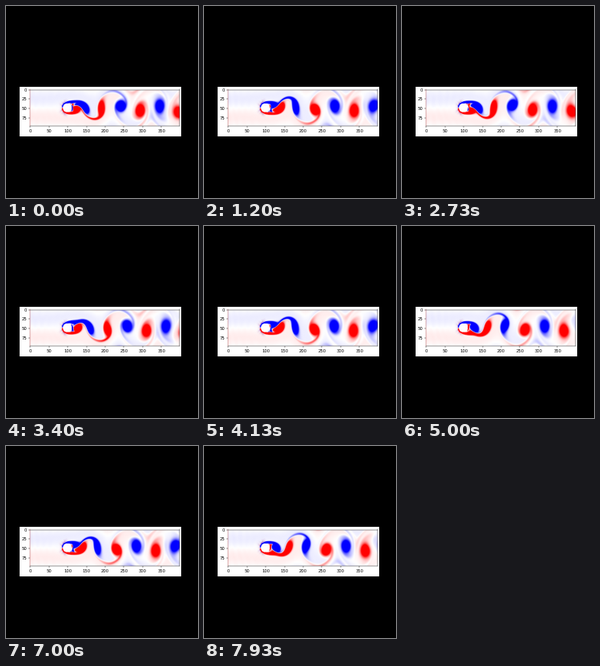
A matplotlib script that plays this animation: 240 px wide and 240 px high, repeating every 8000 ms.

```python
import numpy as np
import matplotlib.pyplot as plt
from matplotlib.animation import FuncAnimation
from matplotlib.patches import Rectangle

# Lattice Boltzmann (D2Q9) flow past a cylinder, shown as vorticity
NX, NY, RADIUS = 400, 100, 13
N = NX * NY
OMEGA = 1 / 0.53
SPEED, SHEAR = 0.126, 0.01
WARMUP, STRIDE = 5000, 5
WAVE = 113                # street wavelength in cells
START = 290 / WAVE        # place of a red vortex at time zero, in wavelengths
FRAMES, LOOP = 120, 8000
PERIOD = 43.75            # frames per shedding cycle

DIRS = [(0, 0), (0, 1), (1, 1), (1, 0), (1, -1),
        (0, -1), (-1, -1), (-1, 0), (-1, 1)]
cx, cy = np.array(DIRS, dtype=float).T
w = np.array([4 / 9] + [1 / 9, 1 / 36] * 4)
opposite = np.array([[DIRS.index((-a, -b))] for a, b in DIRS])
shifts = [(b * NX + a) % N for a, b in DIRS]
leftward = [i for i, (a, b) in enumerate(DIRS) if a < 0]

MOMENTS = np.array([np.ones(9), cx, cy], dtype=np.float32)
EQUIL = np.array([w, 3 * w * cx, 3 * w * cy,
                  w * (4.5 * cx**2 - 1.5), 9 * w * cx * cy,
                  w * (4.5 * cy**2 - 1.5)], dtype=np.float32).T
RELAX = (EQUIL * OMEGA).astype(np.float32)

y, x = np.mgrid[:NY, :NX].astype(float)
disk = np.hypot(x - NX // 4, y - NY // 2) < RADIUS
solid = np.flatnonzero(disk)


def equilibrium(ux, uy):
    one = np.ones_like(ux)
    q = np.array([one, ux, uy, ux * ux, ux * uy, uy * uy], dtype=np.float32)
    return EQUIL @ q.reshape(6, -1)


# Start from a rough wavy wake so that shedding sets in at once
profile = SPEED + SHEAR * np.cos(2 * np.pi * y / NY)
wake = np.exp(-((y - NY / 2) / 16) ** 2) / (1 + np.exp(-(x - 118) / 5))
ux0 = np.where(disk, 0, profile * (1 - 0.4 * wake))
uy0 = np.where(disk, 0, 0.04 * wake * np.sin(2 * np.pi * x / WAVE))
f = equilibrium(ux0, uy0)
inlet = equilibrium(profile[:, 0], np.zeros(NY))
s = np.empty_like(f)
g = np.empty_like(f)
grid = s.reshape(9, NY, NX)
q = np.empty((6, N), dtype=np.float32)


def step():
    for i, d in enumerate(shifts):
        s[i, d:] = f[i, :N - d]
        s[i, :d] = f[i, N - d:]
    grid[:, :, 0] = inlet
    for i in leftward:
        grid[i, :, -1] = grid[i, :, -2]
    np.matmul(MOMENTS, s, out=q[:3])
    ux, uy = q[1] / q[0], q[2] / q[0]
    np.multiply(q[1], ux, out=q[3])
    np.multiply(q[1], uy, out=q[4])
    np.multiply(q[2], uy, out=q[5])
    np.multiply(s, 1 - OMEGA, out=f)
    np.matmul(RELAX, q, out=g)
    np.add(f, g, out=f)
    f[:, solid] = s[opposite, solid]


def vorticity():
    u, v = q[1] / q[0], q[2] / q[0]
    u[solid] = v[solid] = 0
    u, v = u.reshape(NY, NX), v.reshape(NY, NX)
    return (u[2:, 1:-1] - u[:-2, 1:-1]) - (v[1:-1, 2:] - v[1:-1, :-2])


def phase(curl):
    """Offset of the vortex street from its starting place, -0.5 to 0.5."""
    cols = np.arange(260, 260 + WAVE)
    wave = np.exp(-2j * np.pi * cols / WAVE)
    turn = -np.angle((curl[:, cols].sum(axis=0) * wave).sum()) / (2 * np.pi)
    return (turn - START + 0.5) % 1 - 0.5


def record():
    """Return the vorticity fields of one whole shedding cycle."""
    for _ in range(WARMUP):
        step()
    tape, last, running = [], 1.0, False
    for _ in range(600):
        for _ in range(STRIDE):
            step()
        curl = vorticity()
        now = phase(curl)
        if last < 0 <= now and now - last < 0.5:
            if running:
                break
            running = True
        if running:
            tape.append(curl)
        last = now
    return tape or [curl]


tape = record()
limit = 0.43 * np.abs(tape[0][:, 280:370]).max()

SIZE = 240
fig = plt.figure(figsize=(2.4, 2.4), dpi=100, facecolor="black")
fig.add_artist(Rectangle((17 / SIZE, 77 / SIZE), 202 / SIZE, 62 / SIZE,
                         transform=fig.transFigure, facecolor="white",
                         edgecolor="none", zorder=-1))
ax = fig.add_axes([30 / SIZE, 89.6 / SIZE, 186.5 / SIZE, 45.9 / SIZE])
image = ax.imshow(tape[0], cmap="bwr", vmin=-limit, vmax=limit,
                  aspect="auto", interpolation_stage="rgba")
ax.set_xticks(range(0, 400, 50))
ax.set_yticks(range(0, 100, 25))
ax.tick_params(labelsize=3.76, length=1.32, width=0.3, pad=1.32,
               labelfontfamily="DejaVu Sans")
for spine in ax.spines.values():
    spine.set_linewidth(0.3)
ax.spines["left"].set_color("#a03030")


def update(n):
    turn = n / PERIOD % 1
    image.set_data(tape[int(turn * len(tape))])
    return [image]


anim = FuncAnimation(fig, update, frames=FRAMES, interval=LOOP / FRAMES,
                     repeat=True, cache_frame_data=False)
plt.show()
```
